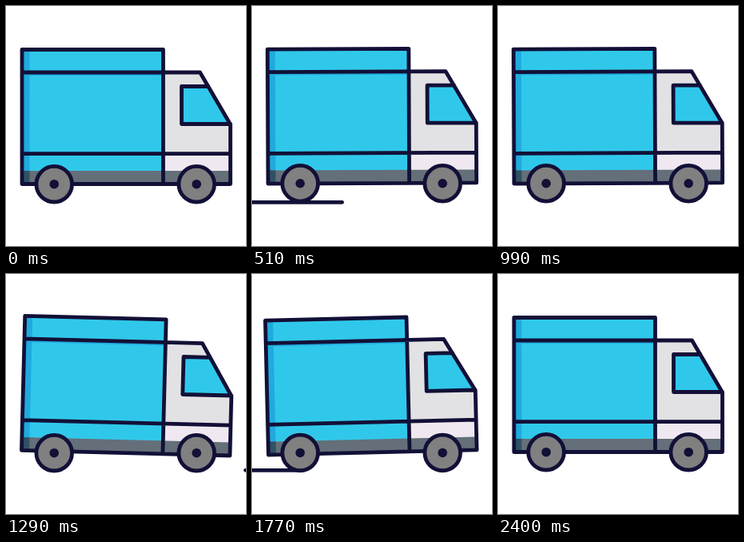
Animation of 300 by 300 pixels, one loop 2430 ms. Source, as an HTML page:

```html
<!DOCTYPE html>
<html lang="en">
<head>
<meta charset="utf-8">
<title>Delivery truck</title>
<style>
  html, body { margin: 0; width: 100%; height: 100%; overflow: hidden; background: #fff; }
  svg { display: block; width: 100%; height: 100%; }
  .ink { fill: none; stroke: #121037; stroke-width: 4.8; stroke-linecap: round; stroke-linejoin: round; }
</style>
</head>
<body>
<svg viewBox="0 0 300 300">
  <path id="road" class="ink" d="M0 245.3H201"/>
  <g id="body">
    <path fill="#30c8ea" d="M20 54.5H196.5V222.5H20Z"/>
    <path fill="#20aade" d="M20 54.5H29.5V222.5H20ZM20 83H196.5V87H20Z"/>
    <path fill="#e2e2e4" d="M196.5 82.5H242.5L280.5 148V222.5H196.5Z"/>
    <path fill="#efe8f0" d="M196.5 185H280.5V206H196.5Z"/>
    <path fill="#646f79" d="M20 206H280.5V222.5H20Z"/>
    <path fill="#2f5263" d="M20 206H29.5V222.5H20Z"/>
    <path fill="#30c8ea" d="M219.5 100.5H253L280.5 147.5H219.5Z"/>
    <path class="ink" d="M20 54.5H196.5V222.5H20ZM20 83H242.5L280.5 148V222.5H196.5M20 184.7H280.5M253 100.5H219.5V147.5H280.5"/>
  </g>
  <g id="wheels">
    <g id="wheel">
      <circle class="ink" cx="60.2" cy="222.7" r="22.3" style="fill:#808080"/>
      <circle cx="60.2" cy="222.7" r="5.8" fill="#121037"/>
    </g>
    <use href="#wheel" x="178"/>
  </g>
</svg>
<script>
  const STEP = 30, LOOP = 2430, ROAD_CYCLE = 40;
  const PEAK = 7, SWAY = 36, STOP = 70, END = 80;
  const TILT = 1.45, BOB = 1;
  const [road, body, wheels] = ["road", "body", "wheels"].map(id => document.getElementById(id));

  // Tilt and bob run from -1 to 1; the bob is twice as fast as the tilt.
  function pose(step) {
    if (step < PEAK) {
      const rise = Math.sin(Math.PI / 2 * step / PEAK);
      return [rise, rise];
    }
    if (step > STOP) {
      const u = (step - STOP) / (END - STOP);
      return [0, -(1 + Math.cos(Math.PI * u)) / 2];
    }
    const phase = 2 * Math.PI * (step - PEAK) / SWAY;
    return [Math.cos(phase), Math.cos(2 * phase)];
  }

  function draw(now) {
    const step = Math.floor(now % LOOP / STEP);
    const [tilt, bob] = pose(step);
    const shift = `translate(0 ${bob * BOB})`;
    wheels.setAttribute("transform", shift);
    body.setAttribute("transform", `${shift} rotate(${tilt * TILT} 142 200)`);
    const roadX = 382.5 - 27.7 * (step % ROAD_CYCLE);
    road.setAttribute("transform", `translate(${roadX} 0)`);
  }

  const start = performance.now();
  function tick() {
    draw(performance.now() - start);
    requestAnimationFrame(tick);
  }
  tick();
</script>
</body>
</html>
```
